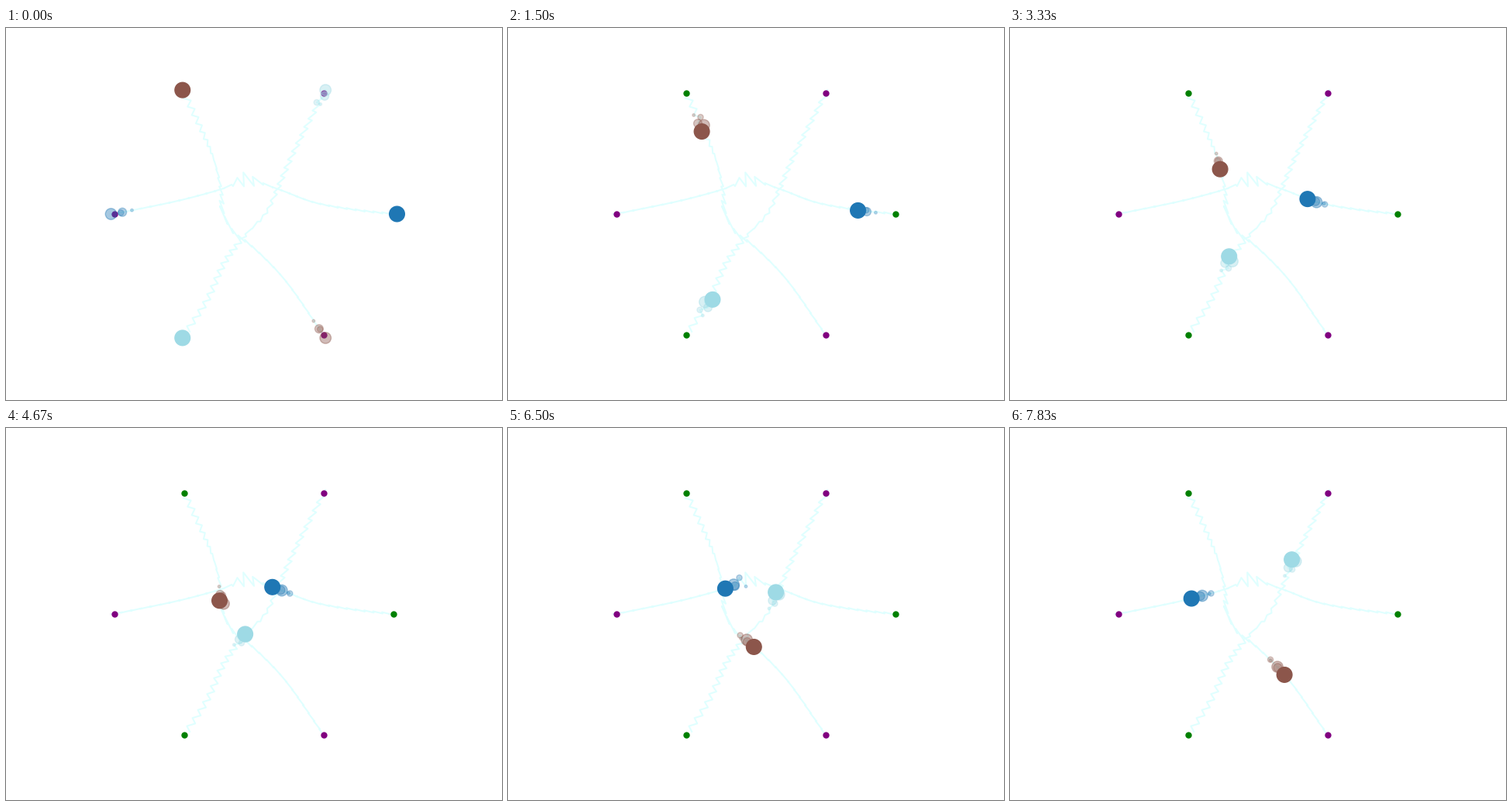
Write a matplotlib script that moves like this. It is 640 px wide and 480 px high and loops after 8000 ms.

```python
import numpy as np
import matplotlib.pyplot as plt
from matplotlib.animation import FuncAnimation

W, H, DPI = 640, 480, 100
LOOP_MS, TICK_MS = 8000, 20
FPS = 6             # agents move six times a second
STEPS = 64          # steps of one full trip from start to goal
TRAIL = 4           # fading past positions behind each agent
CENTER = np.array([320, 240])
RADIUS = 180
OVERSHOOT = 1.025   # first and last step lie a little outside the ring


def smooth(knots, k):
    """Cubic Hermite curve through (step, x, y) knots."""
    knots = np.array(knots, float)
    t, p = knots[:, 0], knots[:, 1:]
    m = np.gradient(p, t, axis=0)
    i = np.clip(np.searchsorted(t, k, side="right") - 1, 0, len(t) - 2)
    h = (t[i + 1] - t[i])[:, None]
    u = (k - t[i])[:, None] / h
    return ((1 + 2 * u) * (1 - u) ** 2 * p[i] + u * (1 - u) ** 2 * h * m[i]
            + u * u * (3 - 2 * u) * p[i + 1] + u * u * (u - 1) * h * m[i + 1])


def trip(knots, first, last, turn, width, burst, peak, spread):
    """A smooth route plus a kick that flips sign on every step.

    The kick eases from `first` to `last` around step `turn`, with an extra
    burst around step `peak`, where the agents dodge each other.
    """
    k = np.arange(STEPS)
    ease = (1 + np.tanh((k - turn) / width)) / 2
    bump = np.exp(-((k - peak) / spread) ** 2)
    kick = (np.outer(1 - ease, first) + np.outer(ease, last)
            + np.outer(bump, burst))
    base = smooth(knots, k)
    path = base + np.where(k % 2, -1, 1)[:, None] * kick
    ends = [0, -1]
    path[ends] = CENTER + OVERSHOOT * (base[ends] - CENTER)
    return path


def ring(degrees):
    a = np.radians(degrees)
    return CENTER[0] + RADIUS * np.cos(a), CENTER[1] - RADIUS * np.sin(a)


blue = trip([(0, 500, 240), (8, 454, 235), (18, 397.5, 225), (28, 347, 206.5),
             (34, 310, 195.5), (39, 283.5, 206), (46, 244, 217.5),
             (63, 140, 240)],
            first=(-3.3, -1.2), last=(4, -1), turn=36, width=3,
            burst=(-2, -8), peak=34, spread=2.5)
brown = trip([(0, 230, 84), (9, 252.5, 132), (18, 269.5, 174), (26, 278.5, 218),
              (30, 279.5, 238), (34, 294, 264), (38, 310.5, 276),
              (46, 347.5, 311), (63, 410, 396)],
             first=(3.8, -1.2), last=(-2.4, -2.8), turn=14, width=8,
             burst=(-1.5, -6), peak=31, spread=3)
cyan = trip([(0, 230, 396), (8, 257.5, 354.5), (19, 283.5, 300), (28, 311, 265),
             (34, 336, 238), (39, 349, 210.5), (46, 365, 173.5),
             (63, 410, 84)],
            first=(-3.6, -1), last=(3.8, -1.5), turn=32, width=5,
            burst=(0, 3.5), peak=31, spread=4)
paths = np.array([blue, brown, cyan])
colors = plt.get_cmap("tab20")(np.linspace(0, 1, 3))

fig = plt.figure(figsize=(W / DPI, H / DPI), dpi=DPI, facecolor="white")
ax = fig.add_axes([0, 0, 1, 1])
ax.set_xlim(0, W)
ax.set_ylim(H, 0)
ax.axis("off")

for path in paths:
    ax.plot(*path[1:].T, color="lightcyan", lw=1.5, zorder=1)
ax.scatter(*ring([0, 120, 240]), s=25, color="green", zorder=2)
ax.scatter(*ring([60, 180, 300]), s=25, color="purple", zorder=2)

# One layer per age: the oldest and smallest at the back, the agents on top.
layers = []
for age in range(TRAIL, -1, -1):
    size = (2.6 * (TRAIL + 1 - age)) ** 2 if age else 200
    alpha = 0.45 - 0.05 * age if age else 1
    dots = ax.scatter([0] * 3, [0] * 3, s=size, c=colors, alpha=alpha,
                      zorder=3 + TRAIL - age)
    layers.append((age, dots))


def update(tick):
    # Look most of a tick ahead, so that no step shows up late.
    step = int((tick + 0.75) * TICK_MS * FPS / 1000)
    for age, dots in layers:
        dots.set_offsets(paths[:, (step - age) % STEPS])
    return [dots for _, dots in layers]


anim = FuncAnimation(fig, update, frames=LOOP_MS // TICK_MS, interval=TICK_MS,
                     repeat=True, repeat_delay=0, blit=False)
plt.show()
```
